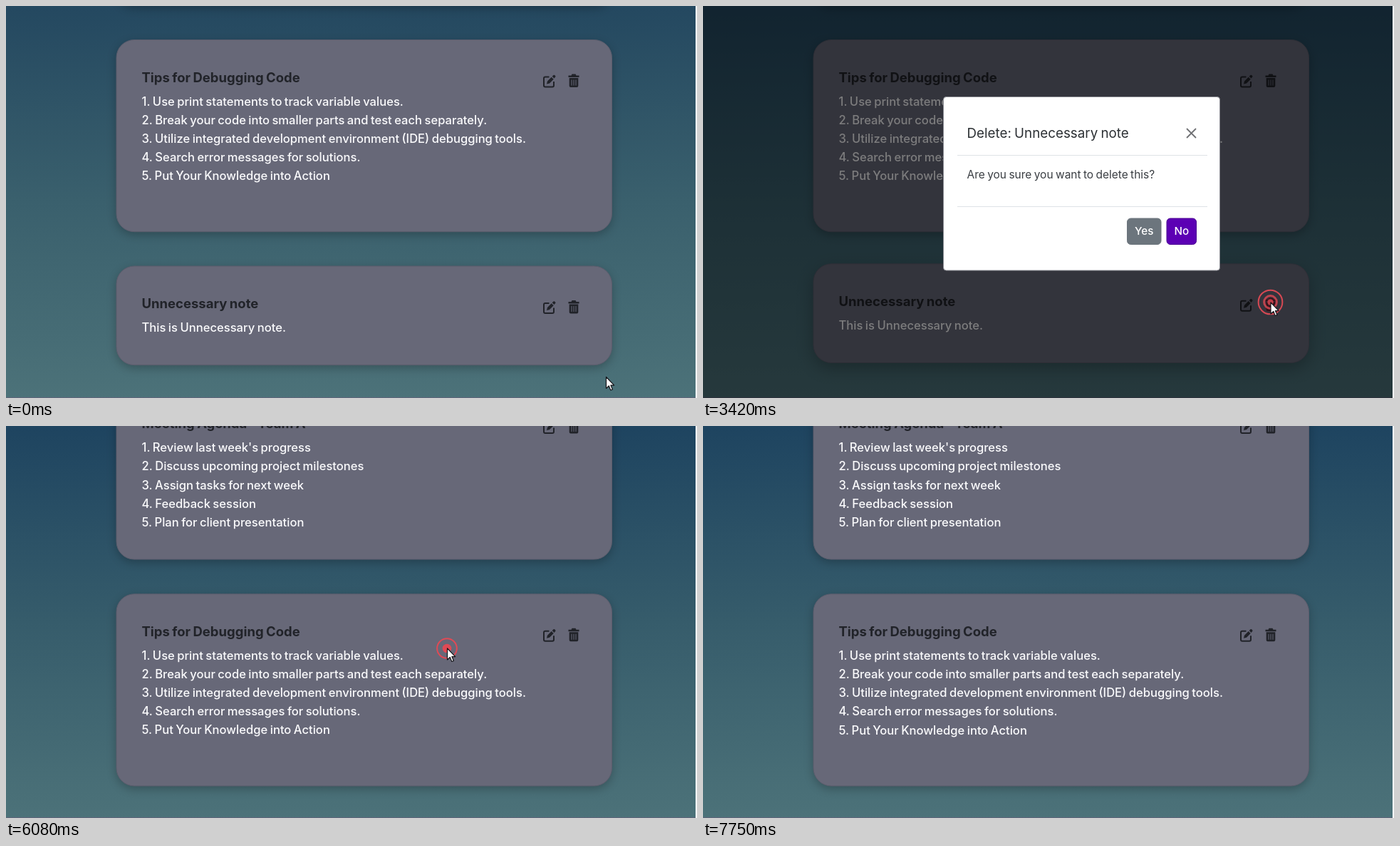
An HTML page with a canvas for the animation above (8.08 s loop, 970 by 550 pixels).

```html
<!DOCTYPE html>
<html lang="en">
<head>
<meta charset="utf-8">
<title>Deleting a note</title>
<style>
html, body { margin: 0; width: 100%; height: 100%; overflow: hidden; background: #365b6b; }
canvas { display: block; }
</style>
</head>
<body>
<canvas id="stage" width="970" height="550"></canvas>
<script>
const ctx = document.getElementById('stage').getContext('2d');
const LOOP = 8080, STEP = 1000 / 12;
const OPEN = 3335, CLOSE = 6082, LEAVE = 7165;
const CARD = '#676878', INK = '#212329', RED = '#e04a55';
const LINE_GAP = 26.1, LIFT = 5;

const meeting = { title: 'Meeting Agenda - Team A', rows: 5, lines: [
  "1. Review last week's progress",
  '2. Discuss upcoming project milestones',
  '3. Assign tasks for next week',
  '4. Feedback session',
  '5. Plan for client presentation'] };
const tips = { title: 'Tips for Debugging Code', rows: 6, lines: [
  '1. Use print statements to track variable values.',
  '2. Break your code into smaller parts and test each separately.',
  '3. Utilize integrated development environment (IDE) debugging tools.',
  '4. Search error messages for solutions.',
  '5. Put Your Knowledge into Action'] };
const extra = { title: 'Unnecessary note', rows: 1, lines: ['This is Unnecessary note.'] };

const clamp = v => Math.max(0, Math.min(1, v));
const ramp = (t, start, length) => {
  const p = clamp((t - start) / length);
  return p * p * (3 - 2 * p);
};
const easeInOut = p => p < .5 ? 2 * p * p : 1 - 2 * (1 - p) ** 2;
const mix = (a, b, p) => a + (b - a) * p;
const mixColor = (a, b, p) => `rgb(${a.map((v, i) => Math.round(mix(v, b[i], p)))})`;

ctx.wordSpacing = '-1px';
function text(str, x, y, size, color, weight = 400) {
  ctx.font = `${weight} ${size}px Inter, "Open Sans", sans-serif`;
  ctx.fillStyle = color;
  ctx.fillText(str, x, y);
}

function box(x, y, w, h, r, fill, stroke) {
  ctx.beginPath();
  ctx.roundRect(x, y, w, h, r);
  ctx.fillStyle = fill;
  ctx.fill();
  if (stroke) {
    ctx.shadowColor = 'transparent';
    ctx.strokeStyle = stroke;
    ctx.lineWidth = 1;
    ctx.stroke();
  }
}

function line(color, width, ...points) {
  ctx.beginPath();
  points.forEach(p => ctx.lineTo(...p));
  ctx.strokeStyle = color;
  ctx.lineWidth = width;
  ctx.stroke();
}

const editFrame = new Path2D('M0-5.5H-5.500Q-7.500-5.500-7.500-3.500V6.500Q-7.500 8.500-5.500 8.500H4.500Q6.500 8.500 6.500 6.500V1');
const editPen = new Path2D('M-3.500 4.500L-2.500 .5L3.200-5.200L6.200-2.200L.5 3.500ZM4.200-6.200L6-8Q6.800-8.600 7.600-8L8.600-7Q9.400-6.200 8.700-5.400L7-3.400Z');
const trashShape = new Path2D('M-7.500-7H-3.500L-2.500-9H2.500L3.500-7H7.500V-4.500H-7.500ZM-6.300-3.500H6.300V7.500Q6.300 9.500 4.300 9.500H-4.300Q-6.300 9.500-6.300 7.500Z');
const arrowShape = new Path2D('M0 0V16L3.800 12.500L6.300 18.500L8.900 17.400L6.400 11.600H11.200Z');
const handShape = new Path2D('M-2 1.500Q-2 0 0 0Q2 0 2 1.500V7Q5 6 5.500 8Q8 7.300 8.300 9.300Q10.500 9 10.500 11V15Q10.500 18 8.500 20V22.500H0V20.500Q-3 17-5.500 13Q-6.500 11-5 10.300Q-3.600 10-2 12.500Z');

function at(x, y, draw) {
  ctx.save();
  ctx.translate(x, y);
  draw();
  ctx.restore();
}

function editIcon(y) {
  at(762.5, y, () => {
    ctx.strokeStyle = ctx.fillStyle = INK;
    ctx.lineWidth = 2;
    ctx.stroke(editFrame);
    ctx.fill(editPen);
  });
}

function trashIcon(y, hot) {
  at(797, y, () => {
    ctx.shadowColor = `rgba(230,30,60,${hot})`;
    ctx.shadowBlur = 12 * hot;
    ctx.fillStyle = mixColor([33, 35, 41], [200, 34, 62], hot);
    ctx.fill(trashShape);
    ctx.shadowColor = 'transparent';
    const slot = mixColor([103, 104, 120], [150, 40, 66], hot);
    for (const x of [-3, 0, 3]) line(slot, 1, [x, -1], [x, 7]);
  });
}

function card(note, top, lift = 0, hot = 0) {
  const y = top - LIFT * lift;
  ctx.save();
  ctx.shadowColor = 'rgba(0,0,0,.26)';
  ctx.shadowBlur = mix(14, 28, lift);
  ctx.shadowOffsetY = mix(4, 10, lift);
  box(155, y, 695.5, 112.6 + LINE_GAP * note.rows, 25, CARD, '#5c5d6d');
  ctx.restore();
  text(note.title, 190.5, y + 59, 18.5, INK, 700);
  note.lines.forEach((str, i) => text(str, 190.5, y + 92.3 + LINE_GAP * i, 16.6, '#fafafc', 500));
  editIcon(y + 57.5);
  trashIcon(y + 57, hot);
}

function button(label, x, w, fill, edge) {
  box(x, 298, w, 36.5, 5, fill, edge);
  ctx.textAlign = 'center';
  text(label, x + w / 2, 321.3, 15.2, '#fff', 500);
  ctx.textAlign = 'left';
}

function dialog(hover) {
  ctx.fillStyle = 'rgba(0,0,0,.5)';
  ctx.fillRect(0, 0, 970, 550);
  box(337.5, 127.5, 388, 243.5, 4, '#fff', '#8a8b92');
  text('Delete: Unnecessary note', 370.5, 185, 18.8, '#2c3034');
  text('Are you sure you want to delete this?', 370.5, 242.3, 15.5, '#3a3e43');
  for (const y of [209.5, 281.5]) line('#dee2e6', 1, [357, y], [708, y]);
  line('#6f7073', 1.8, [679, 172], [692, 185]);
  line('#6f7073', 1.8, [692, 172], [679, 185]);
  const gray = mixColor([108, 117, 125], [86, 94, 100], hover);
  button('Yes', 595.5, 47.5, gray, gray);
  button('No', 651, 41.5, '#5c00b4', '#4a0092');
}

function clickRings(x, y, age) {
  if (age < 0 || age > 420) return;
  const ring = (r, width, alpha) => {
    ctx.globalAlpha = clamp(alpha);
    ctx.beginPath();
    ctx.arc(0, 0, r, 0, 7);
    ctx.lineWidth = width;
    ctx.stroke();
  };
  at(x, y, () => {
    ctx.strokeStyle = ctx.fillStyle = RED;
    ring(13.8 + age * .0375, 2, 1.25 - age / 270);
    ring(4.8 + age * .05, 3, 1 - age / 420);
    ctx.beginPath();
    ctx.arc(0, 0, Math.max(0, 5.2 - age * .012), 0, 7);
    ctx.fill();
  });
}

function pointerPosition(t) {
  if (t < 3900) {
    const e = easeInOut(clamp((t - 1490) / 1285));
    const curve = (a, b, c) => (1 - e) ** 2 * a + 2 * e * (1 - e) * b + e * e * c;
    return [curve(842.5, 799, 797), curve(520.5, 465, 416)];
  }
  const e = easeInOut(clamp((t - 3900) / 920));
  return [mix(797, 619.5, e), mix(416, 312, e)];
}

function pointer(x, y, hand) {
  at(hand ? x + 1.5 : x, hand ? y + 1 : y, () => {
    const shape = hand ? handShape : arrowShape;
    ctx.lineJoin = 'round';
    ctx.lineWidth = 1.2;
    ctx.fillStyle = '#fff';
    ctx.strokeStyle = '#15151a';
    ctx.fill(shape);
    ctx.stroke(shape);
    if (hand) for (const k of [2, 5.4, 8.2]) line('#15151a', 1, [k, 8 + k / 4], [k, 13]);
  });
}

function render(t) {
  const deleted = t >= CLOSE, open = t >= OPEN && !deleted;
  const sky = ctx.createLinearGradient(0, 0, 0, 550);
  sky.addColorStop(0, deleted ? '#1e4460' : '#244860');
  sky.addColorStop(.5, deleted ? '#365c6b' : '#3a606d');
  sky.addColorStop(1, '#4c7279');
  ctx.fillStyle = sky;
  ctx.fillRect(0, 0, 970, 550);

  if (deleted) {
    card(meeting, -56);
    card(tips, 235.8, ramp(t, CLOSE - 2, 200) - ramp(t, LEAVE, 220));
  } else {
    const lift = ramp(t, 1915, 200) - ramp(t, OPEN, 200);
    card(meeting, -244.4);
    card(tips, 47.5);
    card(extra, 365, lift, ramp(t, 2450, 200) - ramp(t, OPEN, 150));
  }
  ctx.fillStyle = '#5f657a';
  ctx.fillRect(0, 549, 970, 1);

  const [x, y] = pointerPosition(t);
  const onYes = open && x < 643 && y < 335;
  if (open) dialog(ramp(t, 4586, 160));
  clickRings(796.5, 415.5, t - OPEN);
  clickRings(619, 312, t - CLOSE);
  if (t < LEAVE) pointer(x, y, onYes);

  ctx.fillStyle = '#fff';
  ctx.fillRect(968, 0, 2, 550);
}

const start = performance.now();
function tick() {
  const t = (performance.now() - start) % LOOP;
  render(Math.floor((t + 4) / STEP) * STEP);
  requestAnimationFrame(tick);
}
tick();
</script>
</body>
</html>
```
